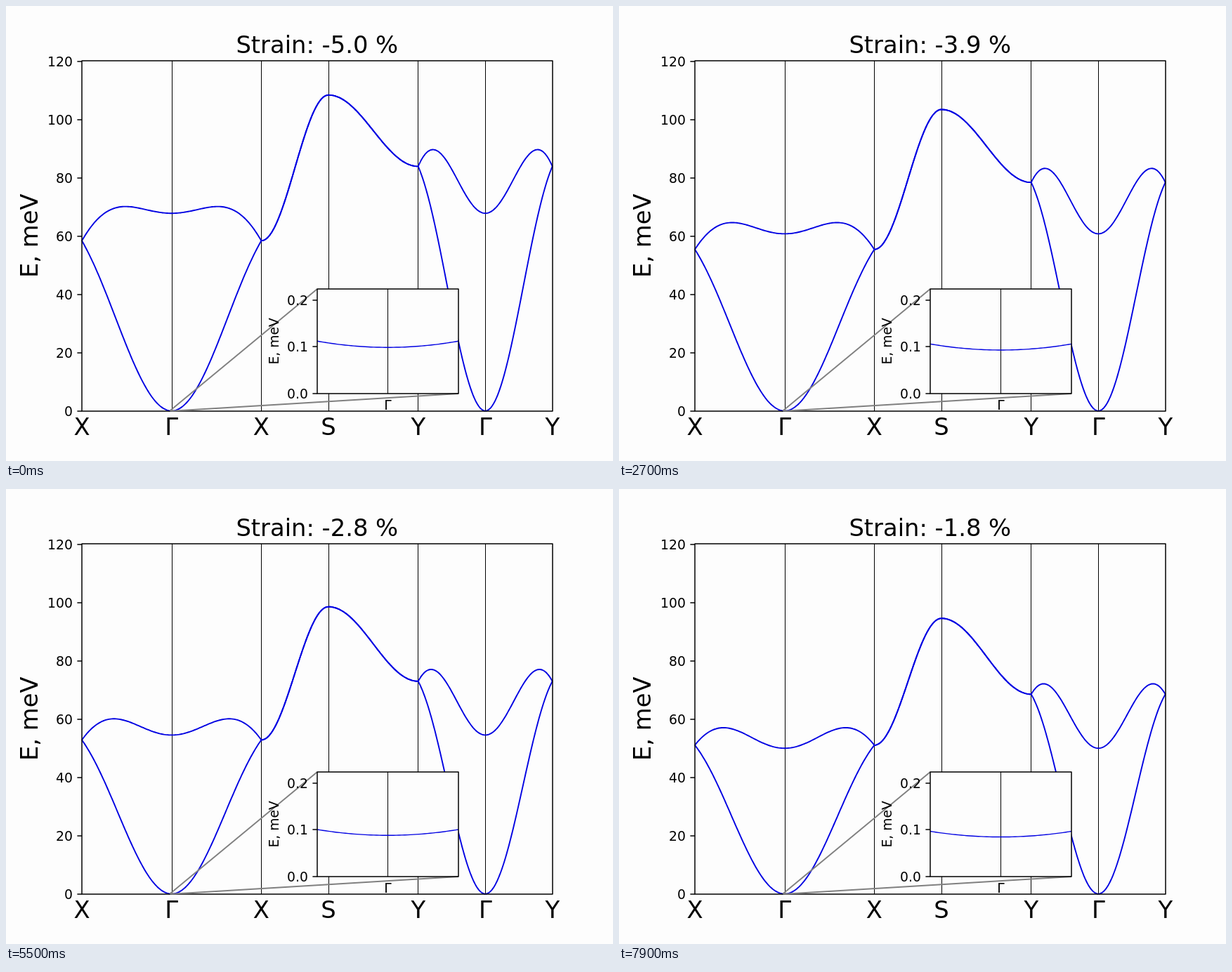
Recreate the animation shown at these times as an HTML page with a canvas. Size 864 px wide and 648 px high, loop 8000 ms.

```html
<!DOCTYPE html>
<html lang="en">
<head>
<meta charset="utf-8">
<title>Strain and dispersion</title>
<style>
html, body { margin: 0; width: 864px; height: 648px; overflow: hidden; background: #fdfdfd; }
canvas { display: block; }
</style>
</head>
<body>
<canvas id="stage" width="864" height="648"></canvas>
<script>
const ctx = document.getElementById('stage').getContext('2d');
const STEPS = 80, STEP_MS = 100;
const PAPER = '#fdfdfd', BLUE = '#0000e2', GRAY = '#808080';

const plot = { left: 108, right: 778, top: 78, bottom: 577, unit: 4.146 };
const inset = { left: 443, right: 644, top: 403, bottom: 552, unit: 667.5 };

// Path through the zone: x position, label, phases (half wave numbers)
const H = Math.PI / 2;
const stops = [
  [108, 'X', H, 0], [235.7, 'Γ', 0, 0], [363.4, 'X', H, 0], [459, 'S', H, H],
  [586.7, 'Y', 0, H], [682.3, 'Γ', 0, 0], [777.7, 'Y', 0, H]
];

function line(color, width, ...points) {
  ctx.strokeStyle = color;
  ctx.lineWidth = width;
  ctx.beginPath();
  points.forEach(([x, y]) => ctx.lineTo(x, y));
  ctx.stroke();
}

function text(str, x, y, size, align = 'center', angle = 0) {
  ctx.save();
  ctx.translate(x, y);
  ctx.rotate(angle);
  ctx.font = size + 'px "DejaVu Sans", sans-serif';
  ctx.textAlign = align;
  ctx.fillStyle = '#000';
  ctx.fillText(str, 0, 0);
  ctx.restore();
}

function frame(box) {
  ctx.strokeStyle = '#000';
  ctx.lineWidth = 1.5;
  ctx.strokeRect(box.left, box.top, box.right - box.left, box.bottom - box.top);
}

function yTicks(box, step, count, digits) {
  for (let i = 0; i < count; i++) {
    const y = Math.round(box.bottom - i * step * box.unit);
    line('#000', 1.5, [box.left - 6.6, y], [box.left, y]);
    text((i * step).toFixed(digits), box.left - 13.1, y + 7, 18.75, 'right');
  }
}

// Two-sublattice ferromagnet; energies are heights in pixels
function bands(n) {
  const gamma = 281.4 - 1.158 * n + 0.0028 * n * n;
  const ex = 242.3 - 0.497 * n + 0.0014 * n * n;
  const ey = 348.2 - 0.864 * n + 0.0007 * n * n;
  const b = gamma / 2;
  return (u, v, sign) =>
    b + (ex - b) * Math.sin(u) ** 2 + (ey - b) * Math.sin(v) ** 2 +
    sign * b * Math.cos(u) * Math.cos(v);
}

function drawBranch(energy, sign) {
  const points = [], parts = 60;
  for (let i = 0; i < stops.length - 1; i++) {
    const [x0, , u0, v0] = stops[i], [x1, , u1, v1] = stops[i + 1];
    for (let j = 0; j <= parts; j++) {
      const f = j / parts;
      const e = energy(u0 + (u1 - u0) * f, v0 + (v1 - v0) * f, sign);
      points.push([x0 + (x1 - x0) * f, plot.bottom - 0.4 - e]);
    }
  }
  line(BLUE, 1.9, ...points);
}

function drawInset(n) {
  const { left, right, top, bottom } = inset;
  ctx.fillStyle = PAPER;
  ctx.fillRect(left, top, right - left, bottom - top);

  // Zoomed area and its connectors
  ctx.strokeStyle = GRAY;
  ctx.lineWidth = 1.9;
  ctx.strokeRect(234.2, 575.8, 3, 0.9);
  line(GRAY, 1.9, [234.2, 575.8], [left, top]);
  line(GRAY, 1.9, [237.2, 576.7], [right, bottom]);

  const mid = (left + right) / 2;
  line('#000', 1, [mid, top], [mid, bottom]);

  const base = 486.2 + 0.15 * n - 0.0004 * n * n;
  const depth = 8.9 - 0.011 * n;
  const points = [];
  for (let i = -25; i <= 25; i++) {
    const f = i / 25;
    points.push([mid + f * (right - left) / 2, base - depth * f * f]);
  }
  line(BLUE, 1.4, ...points);

  frame(inset);
  yTicks(inset, 0.1, 3, 1);
  text('Γ', mid, 574.5, 18.75);
  text('E, meV', 388, 477.3, 18.75, 'center', -H);
}

function draw(n) {
  ctx.fillStyle = PAPER;
  ctx.fillRect(0, 0, 864, 648);
  ctx.lineJoin = 'round';

  stops.slice(1, -1).forEach(([x]) => {
    const px = Math.floor(x) === 235 ? 236.5 : Math.floor(x) + 0.5;
    line('#000', 1, [px, plot.top], [px, plot.bottom]);
  });

  const energy = bands(n);
  drawBranch(energy, -1);
  drawBranch(energy, 1);

  frame(plot);
  yTicks(plot, 20, 7, 0);
  stops.forEach(([x, name]) => text(name, x, 611, 33.75));
  text('E, meV', 44.5, 327.2, 33.75, 'center', -H);
  text('Strain: ' + (-5 + n * 10 / 249).toFixed(1) + ' %', 442.8, 66.7, 33.75);

  drawInset(n);
}

let start;
function tick(now) {
  if (start === undefined) start = now;
  draw(Math.floor((now - start) / STEP_MS) % STEPS);
  requestAnimationFrame(tick);
}
draw(0);
requestAnimationFrame(tick);
</script>
</body>
</html>
```
